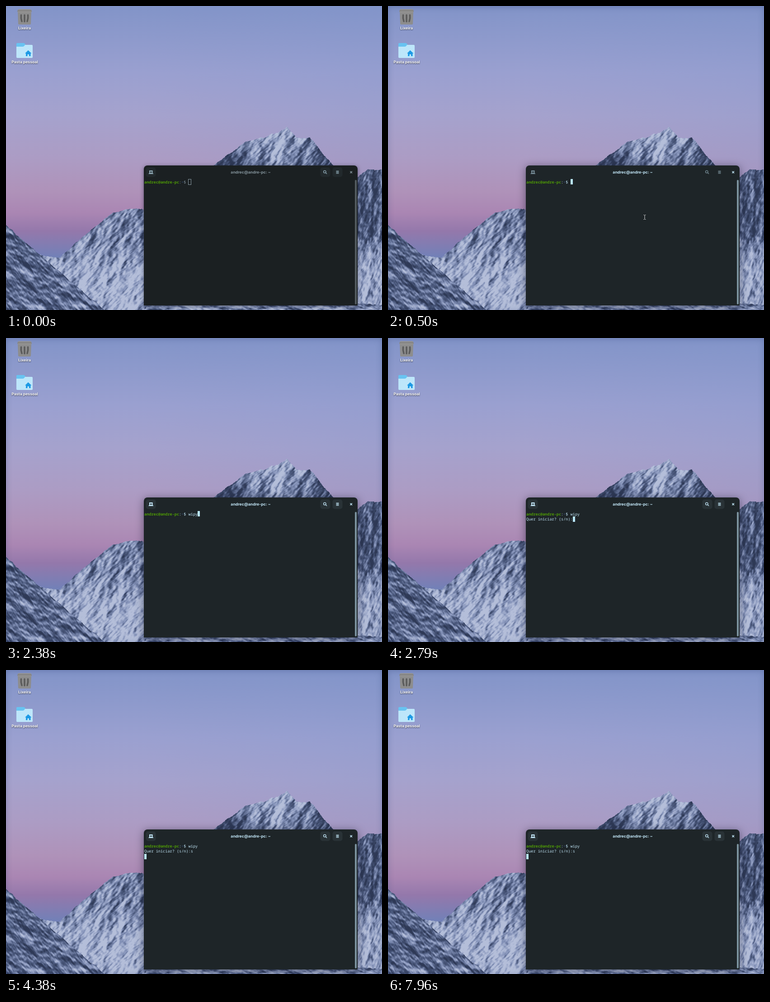
Recreate the animation shown at these times as an HTML page with a canvas. Size 832 by 673 pixels, loop 8 s.

```html
<!DOCTYPE html>
<html lang="pt">
<head>
<meta charset="utf-8">
<title>Terminal</title>
<style>
html, body { margin: 0; width: 100%; height: 100%; overflow: hidden; background: #9ca0cf; }
canvas, svg, #edge { position: absolute; left: 0; top: 0; width: 832px; height: 673px; }
#edge { box-shadow: inset 0 2px 14px rgba(45, 65, 120, .3); }
#win { position: absolute; left: 305px; top: 352.5px; width: 473px; height: 310.5px; border-radius: 8px 8px 0 0; }
text { text-rendering: geometricPrecision; white-space: pre; }
.ui { font: 700 8.7px Inter, sans-serif; text-anchor: middle; }
.label { fill: #fff; font-size: 8.6px; text-shadow: 0 1px 2px rgba(0, 0, 0, .75); }
.term { font: 8.57px "Noto Sans Mono", "DejaVu Sans Mono", monospace; fill: var(--fg); }
.user { font-weight: 600; fill: #4e9a06; }
#mouse { fill: none; stroke: #e8eef0; filter: drop-shadow(0 0 1px #000); }
</style>
</head>
<body>
<canvas id="land" width="832" height="673"></canvas>
<div id="edge"></div>
<div id="win"></div>
<svg viewBox="0 0 832 673">
  <!-- desktop icons -->
  <path d="M26 12H56L55 39Q55 41 53 41H29Q27 41 27 39Z" fill="#8d8d8d"/>
  <path d="M28 7H54Q57 9 57 13H25Q25 9 28 7Z" fill="#858585"/>
  <path d="M27 8H55M26 13H56" stroke="#a3a09c"/>
  <path d="M33.5 20Q32.5 27 35 34M41 20V34.5M48.5 20Q49.5 27 47 34" fill="none" stroke="#5b5b5b" stroke-width="3.6" stroke-linecap="round"/>
  <text class="ui label" x="41" y="52">Lixeira</text>
  <path d="M23 92V84Q23 82 25 82H39Q41 82 42 84L44 87V92Z" fill="#68c3f1"/>
  <path d="M23 90H37Q40 90 42 86H57Q59 86 59 88V113Q59 115 57 115H25Q23 115 23 113Z" fill="#bde6fa"/>
  <path d="M49 98L56.5 105H54.5V111H51V107H47.5V111H44V105H42Z" fill="#1d9ae5"/>
  <text class="ui label" x="41.5" y="127">Pasta pessoal</text>

  <!-- header bar -->
  <g id="plates" fill="#293236">
    <rect x="309.5" y="357.5" width="22" height="21" rx="5"/>
    <rect x="695.5" y="357.5" width="22" height="21" rx="5"/>
    <rect x="722.5" y="357.5" width="22" height="21" rx="5"/>
  </g>
  <g id="icons" fill="none" stroke="#c3e7f8" stroke-width="1.3">
    <path d="M317 364H324.5V370.5H326V372H315.5V370.5H317Z" fill="#c3e7f8" stroke="none"/>
    <path d="M320.75 365.5V370M318.5 367.75H323" stroke="#273034"/>
    <circle cx="705.3" cy="367" r="2.7"/>
    <path d="M707.3 369L710 371.8M730.5 365.5H736.5M730.5 368H736.5M730.5 370.5H736.5"/>
  </g>
  <path d="M761.5 365.7L766 370.2M766 365.7L761.5 370.2" stroke="var(--fg)" stroke-width="1.5"/>
  <text class="ui" x="541.5" y="371" fill="var(--fg)">andrec@andre-pc: ~</text>

  <!-- terminal -->
  <rect x="772" y="385" width="4" height="275.5" rx="2" fill="var(--bar)"/>
  <text class="term" x="306" y="392.5"><tspan class="user">andrec@andre-pc</tspan>:<tspan fill="#3f62a0">~</tspan>$ <tspan id="cmd"></tspan></text>
  <text class="term" id="ask" x="306" y="404.3"></text>
  <rect id="caret" height="12"/>
  <path id="mouse" d="M565.5 462.5H567L568 463.5L569 462.5H570.5M568 463.5V471.5M565.5 472.5H567L568 471.5L569 472.5H570.5"/>
</svg>
<script>
const W = 832, H = 673;
const $ = id => document.getElementById(id);
const ramp = (t, a, b) => Math.min(1, Math.max(0, (t - a) / (b - a)));
const lerp = (a, b, k) => a + (b - a) * k;
const mix = (a, b, k) => a.map((v, i) => lerp(v, b[i], k));

// ---- landscape: sky gradient and noise-lit slopes ----
const SKY = { 0: '#8294c8', .22: '#9aa0d0', .36: '#a5a2cd', .5: '#ac9cc4', .61: '#af92b9',
  .68: '#aa86b3', .74: '#9478ab', .83: '#7081b8' };
const TONES = [[46, 57, 86], [76, 90, 126], [134, 148, 186], [180, 190, 217]];

const hash = (i, j) => {
  const s = Math.sin(i * 127.1 + j * 311.7) * 43758.5453;
  return s - Math.floor(s);
};
function noise(x, y) {
  const i = Math.floor(x), j = Math.floor(y);
  const ease = f => f * f * (3 - 2 * f), fx = ease(x - i), fy = ease(y - j);
  return lerp(lerp(hash(i, j), hash(i + 1, j), fx), lerp(hash(i, j + 1), hash(i + 1, j + 1), fx), fy);
}
function fractal(x, y) {
  let sum = 0;
  for (let o = 0; o < 4; o++) sum += noise(x * 2 ** o + o * 17, y * 2 ** o) * .6 ** o;
  return sum / 2.2;
}

function ridgeAt(ridge, x) {
  const i = Math.max(1, ridge.findIndex(p => p[0] >= x));
  const [x0, y0] = ridge[i - 1], [x1, y1] = ridge[i];
  return lerp(y0, y1, (x - x0) / (x1 - x0)) + (fractal(x / 14, y0) - .5) * 8;
}

function tone(k) {
  const s = Math.min(2.999, Math.max(0, k * 3)), i = Math.floor(s);
  return mix(TONES[i], TONES[i + 1], s - i);
}

// snow(x, y) is the mean brightness, angle the direction of the gullies.
const mountains = [
  { ridge: [[456, 354], [525, 302], [590, 284], [620, 267], [640, 290], [672, 292], [726, 354]],
    angle: 2.3, snow: (x, y) => .92 - Math.abs(x - 600) / 210 - ramp(y, 290, 353) * .25 },
  { ridge: [[776, 378], [800, 361], [814, 364], [832, 361]],
    angle: 1.9, snow: (x, y) => lerp(.3, .76, ramp(y, 500, 550)) },
  { ridge: [[300, 660], [832, 660]], angle: .3, snow: () => .62 },
  { ridge: [[60, 549], [120, 555], [185, 497], [235, 458], [275, 448], [310, 452]],
    angle: 2.3, snow: (x, y) => lerp(.58, .88, ramp(y, 520, 590)) },
  { ridge: [[0, 485], [80, 555], [217, 673]], angle: .8, snow: () => .38 }
];

function landscape() {
  const ctx = $('land').getContext('2d');
  const sky = ctx.createLinearGradient(0, 0, 0, H);
  for (const at in SKY) sky.addColorStop(at, SKY[at]);
  const cool = ctx.createLinearGradient(300, 0, W, 0);
  cool.addColorStop(0, 'rgba(130,150,205,0)');
  cool.addColorStop(1, 'rgba(130,150,205,.22)');
  for (const fill of [sky, cool]) {
    ctx.fillStyle = fill;
    ctx.fillRect(0, 0, W, H);
  }
  const img = ctx.getImageData(0, 0, W, H);
  for (const { ridge, angle, snow } of mountains) {
    const c = Math.cos(angle), s = Math.sin(angle);
    for (let x = ridge[0][0]; x < ridge[ridge.length - 1][0]; x++) {
      for (let y = Math.ceil(ridgeAt(ridge, x)); y < H; y++) {
        if (x > 313 && x < 770 && y > 360 && y < 660) continue; // behind the window
        const u = (x * c + y * s) / 34, v = (y * c - x * s) / 15;
        const light = fractal(u, v) - fractal(u + .12, v + .22);
        img.data.set(tone(snow(x, y) + light * 2.6), (y * W + x) * 4);
      }
    }
  }
  ctx.putImageData(img, 0, 0);
}

// ---- animation ----
const LOOP = 8000, WAKE = 40, FOCUS = 490, REPLY = 2790, BLINK = 595;
const KEYS = 'wipy\ns\n', KEY_TIMES = [1750, 1830, 2000, 2380, 2670, 4290, 4380];
const CHAR = 5.142, ROW = 11.9;

function drawWindow(t) {
  const k = ramp(t, FOCUS - 40, FOCUS), lit = ramp(t, FOCUS, 670);
  const color = (a, b) => `rgb(${mix(a, b, k).map(Math.round)})`;
  const root = document.documentElement.style;
  root.setProperty('--fg', color([132, 148, 156], [195, 231, 248]));
  root.setProperty('--bar', color([83, 91, 95], [123, 146, 158]));
  $('win').style.background = color([27, 32, 34], [30, 37, 40]);
  $('win').style.boxShadow = `0 ${2 + k}px ${8 + 10 * k}px rgba(15,20,40,.5)`;
  $('edge').style.opacity = ramp(t, WAKE, 250);
  $('plates').style.opacity = lit || .5 * (1 - k);
  $('icons').style.opacity = lerp(lerp(.68, .5, k), 1, lit);
  $('mouse').style.display = t >= WAKE && t < 1670 ? '' : 'none';
}

function drawTerminal(t) {
  const pressed = KEY_TIMES.filter(at => at <= t);
  const lines = KEYS.slice(0, pressed.length).split('\n');
  const row = lines.length - 1;
  const cmd = lines[0], ask = t >= REPLY ? 'Quer iniciar? (s/n):' + lines[1] : '';
  $('cmd').textContent = cmd;
  $('ask').textContent = ask;

  const focused = t >= FOCUS, caret = $('caret');
  const col = [19 + cmd.length, ask.length, 0][row];
  const inset = focused ? 0 : .5;
  caret.setAttribute('x', Math.round(306 + col * CHAR) - inset);
  caret.setAttribute('y', Math.round(383.3 + row * ROW) + inset);
  caret.setAttribute('width', focused ? 5 : 6);
  caret.setAttribute('fill', focused ? '#b9e7fb' : 'none');
  caret.setAttribute('stroke', focused ? 'none' : '#86979f');
  // every key press restarts the blinking
  const since = t - (pressed.pop() || FOCUS);
  caret.style.display = focused && Math.floor(since / BLINK) % 2 ? 'none' : '';
}

landscape();
const start = performance.now();
function frame() {
  const t = (performance.now() - start) % LOOP;
  drawWindow(t);
  drawTerminal(t);
  requestAnimationFrame(frame);
}
frame();
</script>
</body>
</html>
```
